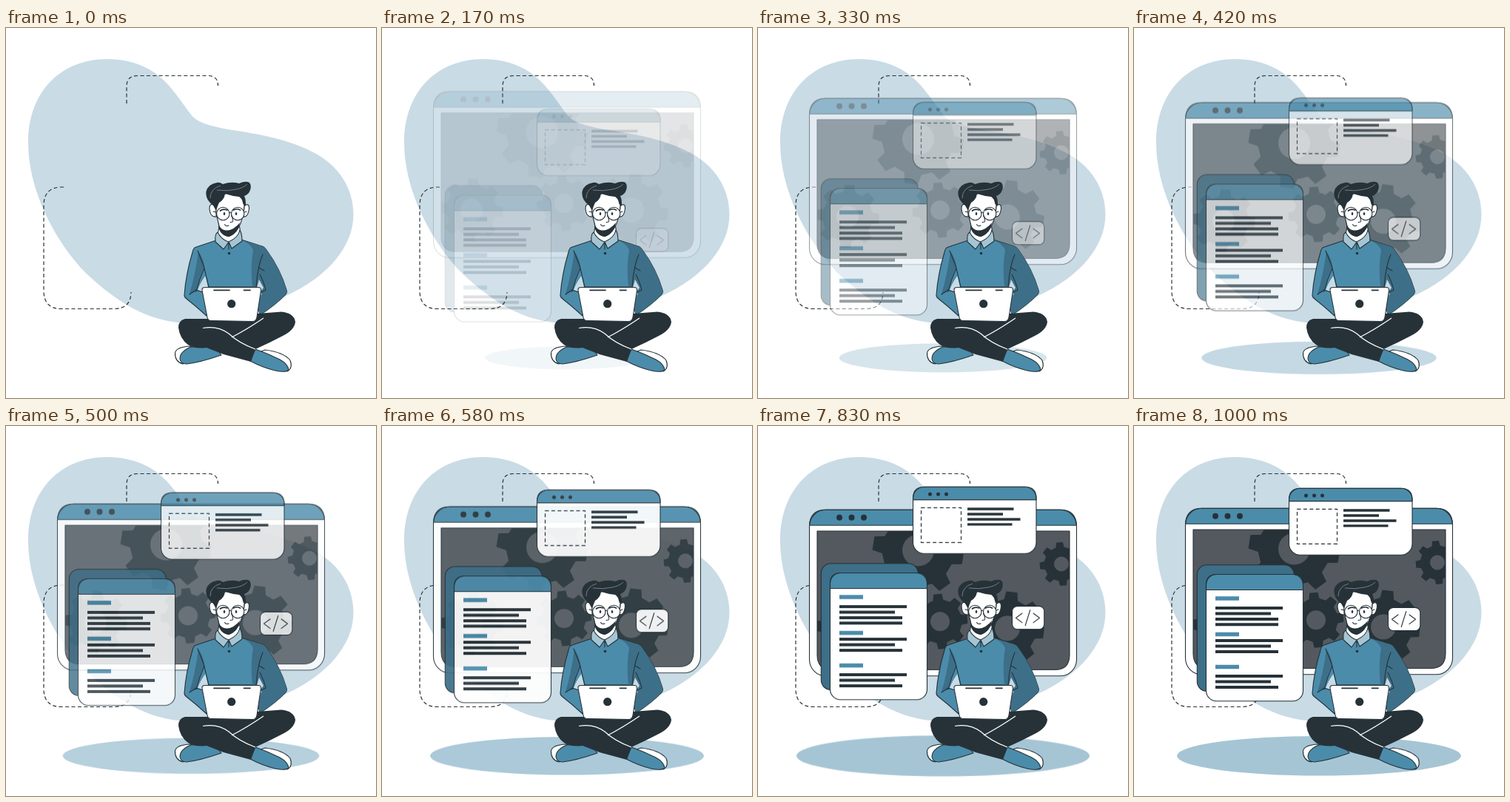
An HTML page that plays this animation: 500x500 px, repeating every 1040 ms.

```html
<!DOCTYPE html>
<html lang="en">
<head>
<meta charset="utf-8">
<title>Developer at work</title>
<style>
  html, body { margin: 0; width: 100%; height: 100%; overflow: hidden; background: #fff; }
  svg { display: block; width: 100vw; height: 100vh; }

  .ink { fill: #263238; }
  .blue { fill: #4b8cab; }
  .deep { fill: #3d6f88; }
  .pale { fill: #a5c5d5; }
  .white { fill: #fff; }
  .screen { fill: #53595f; }
  .blob { fill: #c9dbe5; }
  .line { stroke: #263238; stroke-width: 1.1; stroke-linejoin: round; stroke-linecap: round; }
  .bold { stroke-width: 1.7; }
  .open { fill: none; }
  .dash { fill: none; stroke: #263238; stroke-width: 1.2; stroke-dasharray: 5 3.4; }
  .bars { fill: none; stroke: #263238; stroke-width: 4; }
  .thin { stroke-width: 3.3; }
  .heads { fill: none; stroke: #4b8cab; stroke-width: 5.4; }

  .down, .up { animation: slide 1040ms infinite; }
  .down { --from: -28.57px; }
  .up { --from: 28.57px; }
  .zoom { animation: zoom 1040ms infinite; transform-origin: 250px 445.7px; }

  /* hidden for 80 ms, then one overshooting move that settles at 972 ms */
  @keyframes slide {
    0% { opacity: 0; transform: translateY(var(--from)); animation-timing-function: step-end; }
    7.69% { opacity: .048; transform: translateY(var(--from)); animation-timing-function: cubic-bezier(.317, .252, .499, 1.353); }
    93.46%, 100% { opacity: 1; transform: translateY(0); }
  }
  @keyframes zoom {
    0% { opacity: 0; transform: scale(.524); animation-timing-function: step-end; }
    7.69% { opacity: .048; transform: scale(.524); animation-timing-function: cubic-bezier(.317, .252, .499, 1.353); }
    93.46%, 100% { opacity: 1; transform: scale(1); }
  }
</style>
</head>
<body>
<svg viewBox="0 0 500 500">
  <defs>
    <clipPath id="pane"><path d="M80 140H421V307.500Q421 327.500 401 327.500H100Q80 327.500 80 307.500Z"/></clipPath>
  </defs>

  <path class="blob" d="M30 155C30 85 75 42 137 42C175 42 203 57 222 80C234 94 242 107 250 117C258 128 275 132 300 137C340 143 383 150 419 170C450 187 469.500 217 469.500 252C469.500 295 435 336 380 361C345 375 318 399 250 399C190 399 146 366 112 335C74 299 30 226 30 155Z"/>
  <path class="dash" d="M163 102V79Q163 64.500 177.500 64.500H273Q286.500 64.500 286.500 78"/>
  <path class="dash" d="M78 215H74Q51 216 51 240V355Q51 379.500 75 379.500H146Q168.500 379.500 169 357"/>

  <ellipse class="zoom pale" cx="250" cy="445.700" rx="192" ry="26.800"/>

  <!-- main window -->
  <g class="down">
    <rect class="white" x="69.500" y="111.300" width="361" height="224.500" rx="22"/>
    <path class="blue line" d="M69.500 132.300Q70.500 111.300 91.500 111.300H408.500Q429.500 111.300 430.500 132.300Z"/>
    <rect class="open line" x="69.500" y="111.300" width="361" height="224.500" rx="22"/>
    <g class="ink">
      <circle cx="110" cy="121.800" r="4"/><circle cx="126.500" cy="121.800" r="4"/><circle cx="143" cy="121.800" r="4"/>
    </g>
    <g clip-path="url(#pane)">
      <rect class="screen" x="80" y="140" width="341" height="188"/>
      <g id="gears" class="ink" fill-rule="evenodd"></g>
    </g>
    <path class="open line" d="M80 140H421V307.500Q421 327.500 401 327.500H100Q80 327.500 80 307.500Z"/>
  </g>

  <!-- small window -->
  <g class="up">
    <rect class="white" x="209.500" y="84.300" width="166.500" height="90" rx="15"/>
    <path class="blue line" d="M209.500 101.600V99.300Q209.500 84.300 224.500 84.300H361Q376 84.300 376 99.300V101.600Z"/>
    <rect class="open line" x="209.500" y="84.300" width="166.500" height="90" rx="15"/>
    <g class="ink">
      <circle cx="232.500" cy="94" r="2.500"/><circle cx="243.500" cy="94" r="2.500"/><circle cx="254.500" cy="94" r="2.500"/>
    </g>
    <rect class="dash" x="220.500" y="112.300" width="54" height="47"/>
    <path class="bars thin" d="M283 114h62.500M283 121h48M283 128h71.500M283 134.800h60.500"/>
  </g>

  <!-- documents -->
  <g class="up">
    <rect class="deep line" x="85.300" y="187.800" width="131" height="170.500" rx="13"/>
    <rect class="white" x="97.500" y="200.500" width="131" height="171.200" rx="14"/>
    <path class="blue line" d="M97.500 221.500V214.500Q97.500 200.500 111.500 200.500H214.500Q228.500 200.500 228.500 214.500V221.500Z"/>
    <rect class="open line" x="97.500" y="200.500" width="131" height="171.200" rx="14"/>
    <path class="heads" d="M110 233h32M110 281.500h32M110 325.500h32"/>
    <path class="bars" d="M110 246h91M110 253.500h75M110 261h85M110 268.300h85M110 290h91M110 297.500h75M110 305h85M110 338h91M110 345.500h75M110 353h85"/>
  </g>

  <!-- code badge -->
  <g class="up">
    <rect class="white line" x="343.500" y="245.400" width="43.300" height="31.200" rx="7"/>
    <path class="open line" d="M357 255L348.500 261.300L357 267.600M367.800 250.500L361.200 271.500M372 255L380.500 261.300L372 267.600"/>
  </g>

  <g id="person">
    <!-- sweater -->
    <path class="blue line" d="M284 287L257 296Q253 297 252 303Q243 333 241 361Q241 364 244 366Q257 376 271 389L274 372L266 357L274 350H333L338 356L347 358L340 374L343 388Q363 375 378 360Q380 358 379 354Q371 326 352 300Q349 295 343 294L318 286Z"/>
    <path class="deep" d="M319 287L343 294Q349 295 352 300Q371 326 379 354Q380 358 378 360Q363 375 343 388L340 374L346 357L342 351L333 350Q330 322 334 300Q330 291 319 287Z"/>
    <path class="deep" d="M260 302Q267 311 268 322Q260 339 257 356L248 359Q255 337 260 302Z"/>
    <path class="blob" d="M269.500 335L273 350L266 357L259 354Q263 343 269.500 335Z"/>
    <path class="blob" d="M342 340L348 351L344 356L339 351Z"/>
    <path class="open line" d="M259 301L267 321L274 350M268 324Q261 340 257 356M266 357L257 354L248 360M347 306Q340 322 338 350M342 324L349 328M343 333Q349 345 351 354L345 357"/>

    <!-- neck and collar -->
    <path class="white line" d="M288 268L286 280L301 292L317 278L315 264Z"/>
    <path class="pale line" d="M286 276Q282 278 283 289L294 299L301 289Q291 286 286 276Z"/>
    <path class="pale line" d="M316 273Q314 283 301 289L305 298L319 288Q319 278 316 273Z"/>
    <path class="open line" d="M301 290V299"/>
    <circle class="ink" cx="301.500" cy="304.500" r="1.800"/>

    <!-- head -->
    <path class="white line" d="M284 240Q275 235 275 244Q276 256 284 255Z"/>
    <path class="white line" d="M322 240Q329 236 328.500 244Q327 256 321 255Z"/>
    <path class="white line" d="M284 230Q282 247 287 263Q290 280 300 281.500Q311 279 317 264Q323 249 322 230L305 220Z"/>
    <path class="ink" d="M286 261Q289 274 299 273.500Q308 273 316 263Q314 277 302 282Q291 281 288 272Z"/>
    <path class="ink" d="M280 240Q269 232 270.500 221Q273 211 285 209Q289 208 293 211Q304 207 315 210Q324 206 329 209Q332 213 330 219Q328 225 322 227Q325 233 323.500 241L320.500 238Q319 230 315 228Q305 227 296 224Q295 232 288 236Q286 240 284 247Z"/>
    <path d="M276 230Q276 217 290 213M285 219Q299 221 311 218Q321 216 326 211" fill="none" stroke="#82939c" stroke-width=".8"/>
    <g class="line">
      <circle class="white" cx="293.300" cy="251" r="8.700"/>
      <circle class="white" cx="313.200" cy="251" r="8.700"/>
      <path class="open" d="M302 250Q303.500 248 304.500 250M284.500 249L280 248M322 249L325 248M304.500 253Q308 261 306 262L303 262.500M295.500 265.500Q297 268.500 301 267"/>
      <path class="open bold" d="M289.500 247Q293 244 299 246M307.500 246Q312 243.500 316.500 246"/>
    </g>
    <ellipse class="ink" cx="295" cy="251" rx="1.300" ry="2"/>
    <ellipse class="ink" cx="311" cy="251" rx="1.300" ry="2"/>

    <!-- feet -->
    <path class="white line" d="M249 430Q230 431 228.500 439Q228 451 239 454Q246 449 262 434Z"/>
    <path class="blue line" d="M250 431Q235 437 235 447Q236 454 244 454Q262 452 291 442L282 429Z"/>
    <path class="white line" d="M350 435Q375 438 384 449Q388 460 380 464Q370 455 342 438Z"/>
    <path class="blue line" d="M337 434L330 450Q347 459 364 463Q378 466 382 462Q381 454 370 448Q354 440 337 434Z"/>

    <!-- legs -->
    <path class="ink" d="M273 393H242Q233 395 233 405Q235 420 246 428Q255 434 271 432L294 441L331 451L337 434Q357 425 374 416Q390 408 391 397Q389 385 372 383.500L339 386Z"/>
    <path d="M266 405.500Q286 402 301 413Q315 426 337 434M348 392Q326 407 305 418" fill="none" stroke="#fff" stroke-width="1.200"/>

    <!-- laptop -->
    <path class="white line" d="M269 350.500H341Q345 350.500 344.500 354.500L339 391Q338 396.500 333 396.500L277 395.500Q273 395.500 272 391L265 354.500Q264.500 350.500 269 350.500Z"/>
    <path class="open line bold" d="M281 354.300H302M321.500 354.300H330"/>
    <circle class="ink" cx="304.700" cy="372.700" r="5.600"/>
  </g>
</svg>
<script>
  const TEETH = 8;

  function gearPath(x, y, radius, hole, turn) {
    const at = (r, a) => `${(x + r * Math.cos(a)).toFixed(2)} ${(y + r * Math.sin(a)).toFixed(2)}`;
    const root = radius * 0.79;
    const points = [];
    for (let i = 0; i < TEETH; i++) {
      const a = turn * Math.PI / 180 + i * 2 * Math.PI / TEETH;
      points.push(at(root, a - 0.24), at(radius, a - 0.15), at(radius, a + 0.15), at(root, a + 0.24));
    }
    return `M${points.join('L')}Z` +
      `M${x - hole} ${y}a${hole} ${hole} 0 1 0 ${2 * hole} 0a${hole} ${hole} 0 1 0 ${-2 * hole} 0Z`;
  }

  // x, y, outer radius, hole radius, turn in degrees
  const gears = [
    [216.500, 166, 62, 21.500, 9],
    [246, 262.300, 37.500, 13, -5],
    [337, 271.500, 50, 17, 7],
    [410, 184.500, 29.500, 10, -5],
    [121, 271, 43, 15, 4]
  ];
  const box = document.getElementById('gears');
  for (const gear of gears) {
    const path = document.createElementNS(box.namespaceURI, 'path');
    path.setAttribute('d', gearPath(...gear));
    box.append(path);
  }
</script>
</body>
</html>
```
